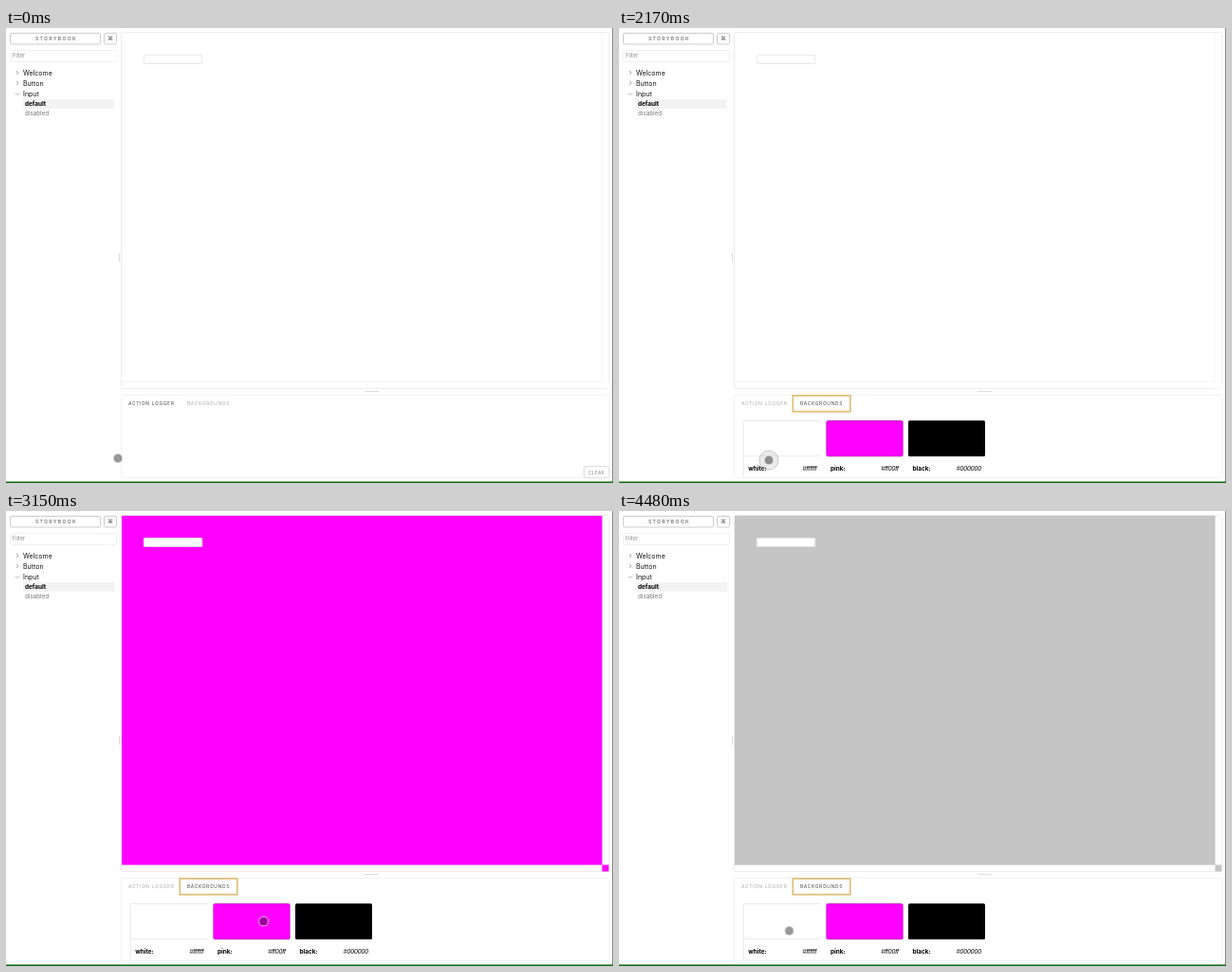
An HTML page for the animation above (4.55 s loop, 640 by 479 pixels).

```html
<!DOCTYPE html>
<html lang="en">
<head>
<meta charset="utf-8">
<title>Background switcher</title>
<style>
  html, body { margin: 0; width: 100%; height: 100%; overflow: hidden; background: #fff; }
  svg { display: block; width: 100%; height: 100%; font-family: Inter, sans-serif; }

  .line { fill: none; stroke: #ececec; }
  .button { fill: #fff; stroke: #ccc; }
  .chevron { fill: none; stroke: #888; stroke-width: .7; }
  .item { font-size: 7px; fill: #111; }
  .caps { font-size: 5px; letter-spacing: .6px; }
  .name { font-size: 6.4px; font-weight: 700; }
  .hex { font: italic 6.75px "Liberation Sans", Arial, sans-serif; text-anchor: end; }

  /* The loop has 65 ticks of 70 ms; stops sit on tick boundaries. */
  .canvas, .pink, .old-panel, .new-panel, .old-tab, .new-tab, .dot, .arrow, .ripple {
    animation: 4550ms step-end infinite;
  }
  .canvas { animation-name: canvas; }
  .pink { animation-name: pink; }
  .old-panel { animation-name: leave; }
  .new-panel { animation-name: enter; }
  .old-tab { animation-name: deactivate; }
  .new-tab { animation-name: activate; }
  .dot { animation-name: dot; }
  .arrow { animation-name: arrow; }
  .ripple { animation-name: ripple; }
  .pointer { animation: move 4550ms step-end infinite; }

  @keyframes canvas {
    0% { fill: #fff; }
    67.692% { fill: #f6f; }
    69.23% { fill: #f0f; }
    83.076% { fill: #eb00eb; }
    84.615% { fill: #550055; }
    86.153% { fill: #0f000f; }
    87.692% { fill: #000; }
    96.923% { fill: #464646; }
    98.461%, 100% { fill: #c5c5c5; }
  }
  @keyframes pink {
    0%, 84.615%, 100% { fill: #f0f; }
    83.076% { fill: #eb00eb; }
  }
  @keyframes leave { 0% { opacity: 1; } 26.153%, 100% { opacity: 0; } }
  @keyframes enter { 0% { opacity: 0; } 26.153%, 100% { opacity: 1; } }
  @keyframes deactivate { 0% { fill: #444; } 30.769%, 100% { fill: #aaa; } }
  @keyframes activate { 0% { fill: #aaa; } 30.769%, 100% { fill: #444; } }

  @keyframes move {
    0% { transform: translate(118px, 453px); animation-timing-function: steps(4); }
    6.153% { transform: translate(137px, 404px); }
    7.692% { transform: translate(137px, 404px); animation-timing-function: steps(7); }
    18.461% { transform: translate(200px, 399px); }
    35.384% { transform: translate(200px, 399px); animation-timing-function: steps(4); }
    41.538% { transform: translate(158px, 455px); }
    53.846% { transform: translate(158px, 455px); animation-timing-function: steps(4); }
    60% { transform: translate(253.5px, 432px); }
    67.692% { transform: translate(258px, 432px); }
    69.23% { transform: translate(271.5px, 432px); animation-timing-function: steps(2); }
    72.307% { transform: translate(351px, 432px); }
    81.538% { transform: translate(325px, 434px); }
    83.076% { transform: translate(288px, 437px); animation-timing-function: steps(4); }
    89.23%, 100% { transform: translate(179.5px, 442px); }
  }
  @keyframes dot {
    0%, 36.923%, 86.153%, 100% { opacity: 1; fill-opacity: .4; }
    27.692% { opacity: 0; fill-opacity: .4; }
    81.538% { opacity: 1; fill-opacity: 0; }
  }
  @keyframes arrow {
    0%, 36.923%, 100% { opacity: 0; }
    27.692% { opacity: 1; }
  }
  @keyframes ripple {
    0%, 27.692%, 49.23%, 78.461%, 93.846%, 100% { opacity: 0; }
    26.153%, 47.692%, 75.384%, 90.769% { opacity: 1; }
  }
</style>
</head>
<body>
<svg viewBox="0 0 640 479" preserveAspectRatio="none">
  <rect width="640" height="479" fill="#fff"/>

  <!-- Sidebar -->
  <rect class="button" x="4.5" y="5.5" width="95" height="11.5" rx="1.5"/>
  <text x="31" y="13.1" font-size="5.2" font-weight="600" letter-spacing="1.25" fill="#777">STORYBOOK</text>
  <rect class="button" x="103.5" y="5.5" width="13" height="11.5" rx="1.5"/>
  <text x="110" y="13.2" text-anchor="middle" font-family="DejaVu Sans, sans-serif" font-size="6" fill="#555">⌘</text>
  <rect class="line" x="4.5" y="23.5" width="112" height="12" rx="1.5" stroke-opacity=".7"/>
  <text x="7" y="31" font-size="5.5" fill="#888">Filter</text>

  <path class="chevron" d="M11 45l2 2-2 2M11 56l2 2-2 2M10 68.5l2 2 2-2"/>
  <g class="item">
    <text x="18" y="49.5">Welcome</text>
    <text x="18" y="60.8">Button</text>
    <text x="18" y="72">Input</text>
  </g>
  <rect x="18" y="75" width="96" height="10" fill="#f3f3f3"/>
  <text x="20" y="82.3" font-size="6.4" font-weight="700">default</text>
  <text x="20" y="92.2" font-size="6.3" fill="#777">disabled</text>
  <path d="M119.5 237v9M378 382.5h15" stroke="#ddd"/>

  <!-- Preview -->
  <rect class="line" x="121.5" y="4.5" width="514.5" height="375" rx="2"/>
  <path class="line" d="M628.5 5V372.5H122"/>
  <g class="canvas">
    <rect x="122" y="5" width="506.5" height="367.5"/>
    <rect x="628.5" y="372.5" width="7" height="7"/>
  </g>
  <rect x="145.3" y="28.5" width="61.5" height="9" rx="1" fill="#fff" stroke="#e2e2e2" stroke-width=".8"/>

  <!-- Panel -->
  <rect class="line" x="121.5" y="386.5" width="514.5" height="87" rx="2" stroke-opacity=".7"/>
  <text class="caps old-tab" x="129" y="397.3">ACTION LOGGER</text>
  <text class="caps new-tab" x="191" y="397.3">BACKGROUNDS</text>

  <g class="old-panel">
    <rect class="button" x="609.5" y="461.5" width="26.5" height="12" rx="1.5" style="stroke:#ddd"/>
    <text x="614" y="469.5" font-size="4.9" letter-spacing=".2" fill="#888">CLEAR</text>
  </g>

  <g class="new-panel">
    <rect x="183.3" y="387" width="60.5" height="16.8" fill="none" stroke="#dfc17e" stroke-width="1.8"/>
    <path class="line" d="M131.5 474V413.5H213M131.5 450.5H213"/>
    <rect class="pink" x="218.8" y="413.5" width="80.4" height="37.3" rx="1.5" stroke="#b800b8" stroke-width=".7"/>
    <rect x="305" y="413.2" width="81" height="37.8" rx="1.5"/>
    <g class="name">
      <text x="136.3" y="466">white:</text>
      <text x="223" y="466">pink:</text>
      <text x="309.5" y="466">black:</text>
    </g>
    <g class="hex">
      <text x="208.5" y="466">#ffffff</text>
      <text x="295" y="466">#ff00ff</text>
      <text x="382" y="466">#000000</text>
    </g>
  </g>

  <!-- Window edges -->
  <path d="M639.5 0V478" stroke="#888"/>
  <path d="M0 478.3H640" stroke="#0b6414" stroke-width="1.4"/>

  <g class="pointer">
    <circle class="ripple" r="10" fill="#000" fill-opacity=".08" stroke="#999" stroke-opacity=".5"/>
    <circle class="dot" r="4.9" stroke="#fff" stroke-opacity=".7"/>
    <path class="arrow" d="M-.3-.5V6.2L1.2 4.8 2.3 7.2 3.5 6.7 2.5 4.3H4.4Z" stroke="#fff" stroke-width=".4"/>
  </g>
</svg>
</body>
</html>
```
